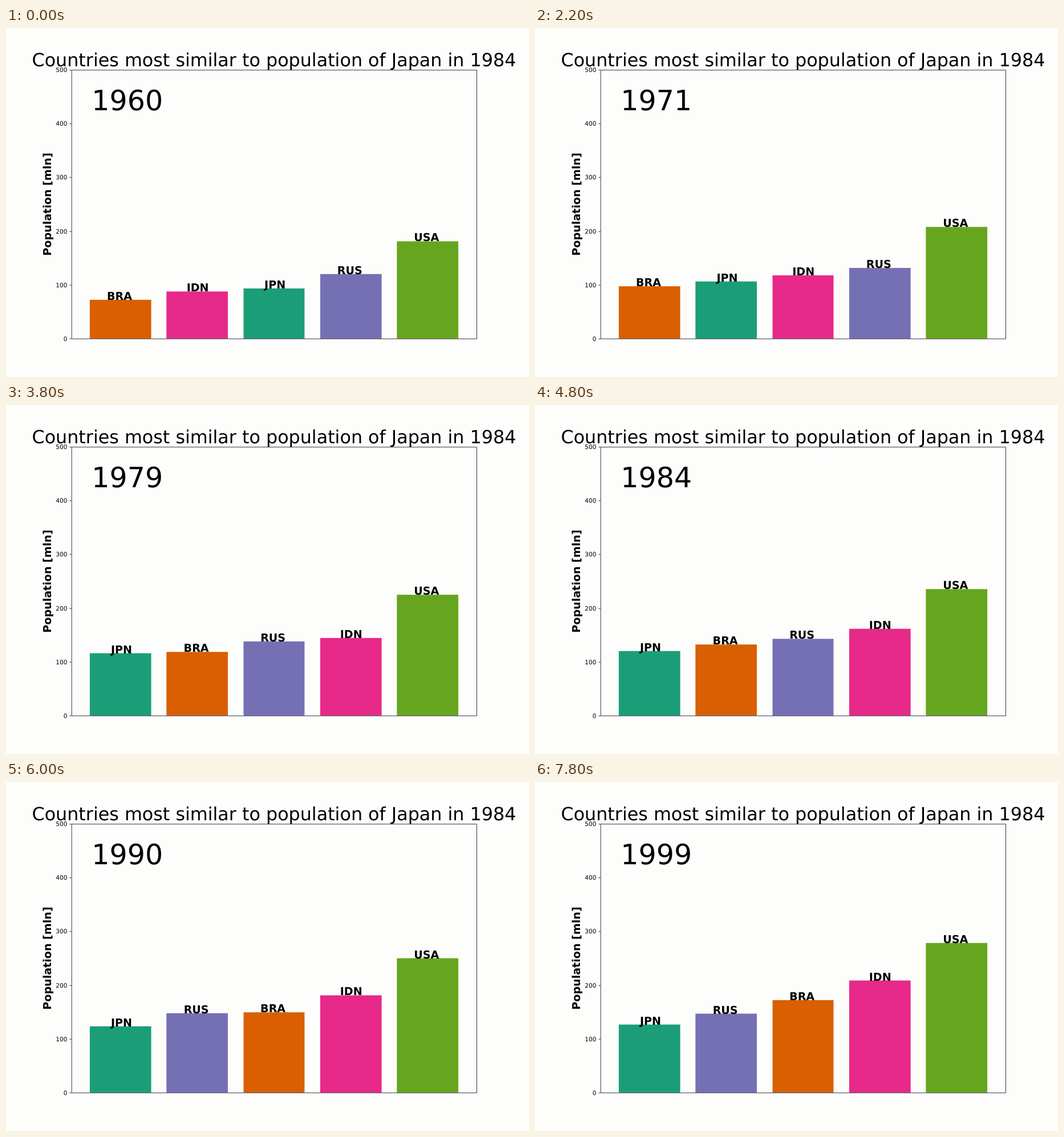
Animation, 917 px wide and 611 px high, one loop 8 s. Source, as an HTML page:

```html
<!DOCTYPE html>
<html lang="en">
<head>
<meta charset="utf-8">
<title>Population by country</title>
<style>
  html, body { margin: 0; width: 100%; height: 100%; overflow: hidden; background: #fdfdfc; }
  svg { display: block; width: 917px; height: 611px; font-family: "DejaVu Sans", sans-serif; }
  text { text-rendering: geometricPrecision; }
  .line { fill: none; stroke: #101028; stroke-width: 1.11; }
  .tick { font-size: 13.89px; text-anchor: end; }
  .name { font-size: 25px; font-weight: bold; text-anchor: end; }
  .axis { font-size: 25px; font-weight: bold; text-anchor: middle; }
  .title { font-size: 41.6px; text-anchor: middle; }
  .year { font-size: 64.2px; }
</style>
</head>
<body>
<svg id="chart" viewBox="0 0 1200 800"></svg>
<script>
const FIRST_YEAR = 1960, YEARS = 40, YEAR_MS = 200;
const LEFT = 150, RIGHT = 1080, TOP = 96, BOTTOM = 712;
const WIDTH = RIGHT - LEFT, HEIGHT = BOTTOM - TOP;
const SLOT = WIDTH / 1.1 / 4.8;          // five bars, each 0.8 of a slot wide
const FIRST_BAR = LEFT + WIDTH / 22;

// Population in millions at the start of each decade, 1960 to 2000.
const countries = [
  { name: "BRA", color: "#d95f02", decades: [72.2, 95.4, 120.9, 149.4, 174.4] },
  { name: "IDN", color: "#e7298a", decades: [87.8, 114.6, 147.5, 181.4, 211.5] },
  { name: "JPN", color: "#1b9e77", decades: [93, 105.3, 116.8, 123.5, 126.8] },
  { name: "RUS", color: "#7570b3", decades: [119.9, 130.4, 139, 148, 146] },
  { name: "USA", color: "#66a61e", decades: [180.7, 205.1, 227.2, 249.6, 283] },
];

const chart = document.getElementById("chart");

function setAll(node, attributes) {
  for (const key in attributes) node.setAttribute(key, attributes[key]);
}

function add(tag, attributes, content = "") {
  const node = document.createElementNS("http://www.w3.org/2000/svg", tag);
  setAll(node, attributes);
  node.textContent = content;
  return chart.appendChild(node);
}

const yOf = value => BOTTOM - value / 500 * HEIGHT;
const lineAt = v => Math.round(v) + .5;

// Smooth curve through all points (Lagrange), x counted in steps between them.
function curve(points, x) {
  return points.reduce((sum, point, i) =>
    sum + points.reduce((product, _, j) => i === j ? product : product * (x - j) / (i - j), point), 0);
}

for (const country of countries) country.bar = add("rect", { fill: country.color });

add("path", { class: "line", d: `M${lineAt(LEFT)} ${lineAt(TOP)}H${lineAt(RIGHT)}V${lineAt(BOTTOM)}H${lineAt(LEFT)}Z` });
for (let value = 0; value <= 500; value += 100) {
  const y = yOf(value);
  add("path", { class: "line", d: `M${LEFT - 4.5} ${lineAt(y)}H${LEFT}` });
  add("text", { class: "tick", x: LEFT - 9.7, y: y + 5.2 }, value);
}
add("text", { class: "title", x: LEFT + WIDTH / 2, y: TOP - 8.3 }, "Countries most similar to population of Japan in 1984");
add("text", { class: "axis", transform: `translate(103 ${TOP + HEIGHT / 2}) rotate(-90)` }, "Population [mln]");
const yearText = add("text", { class: "year", x: LEFT + .05 * WIDTH, y: yOf(425) });

for (const country of countries) country.label = add("text", { class: "name" }, country.name);

function draw(year) {
  yearText.textContent = year;
  for (const country of countries) country.value = curve(country.decades, (year - FIRST_YEAR) / 10);
  [...countries].sort((a, b) => a.value - b.value).forEach(({ bar, label, value }, rank) => {
    const start = FIRST_BAR + rank * SLOT;
    const x = Math.round(start), y = Math.round(yOf(value));
    setAll(bar, { x, y, width: Math.round(start + .8 * SLOT) - x, height: BOTTOM - y });
    setAll(label, { x: start + .55 * SLOT, y });
  });
}

const begin = performance.now();
let shownYear;

function tick() {
  const elapsed = Math.max(0, performance.now() - begin);
  const year = FIRST_YEAR + Math.floor(elapsed / YEAR_MS) % YEARS;
  if (year !== shownYear) draw(shownYear = year);
  requestAnimationFrame(tick);
}
tick();
</script>
</body>
</html>
```
